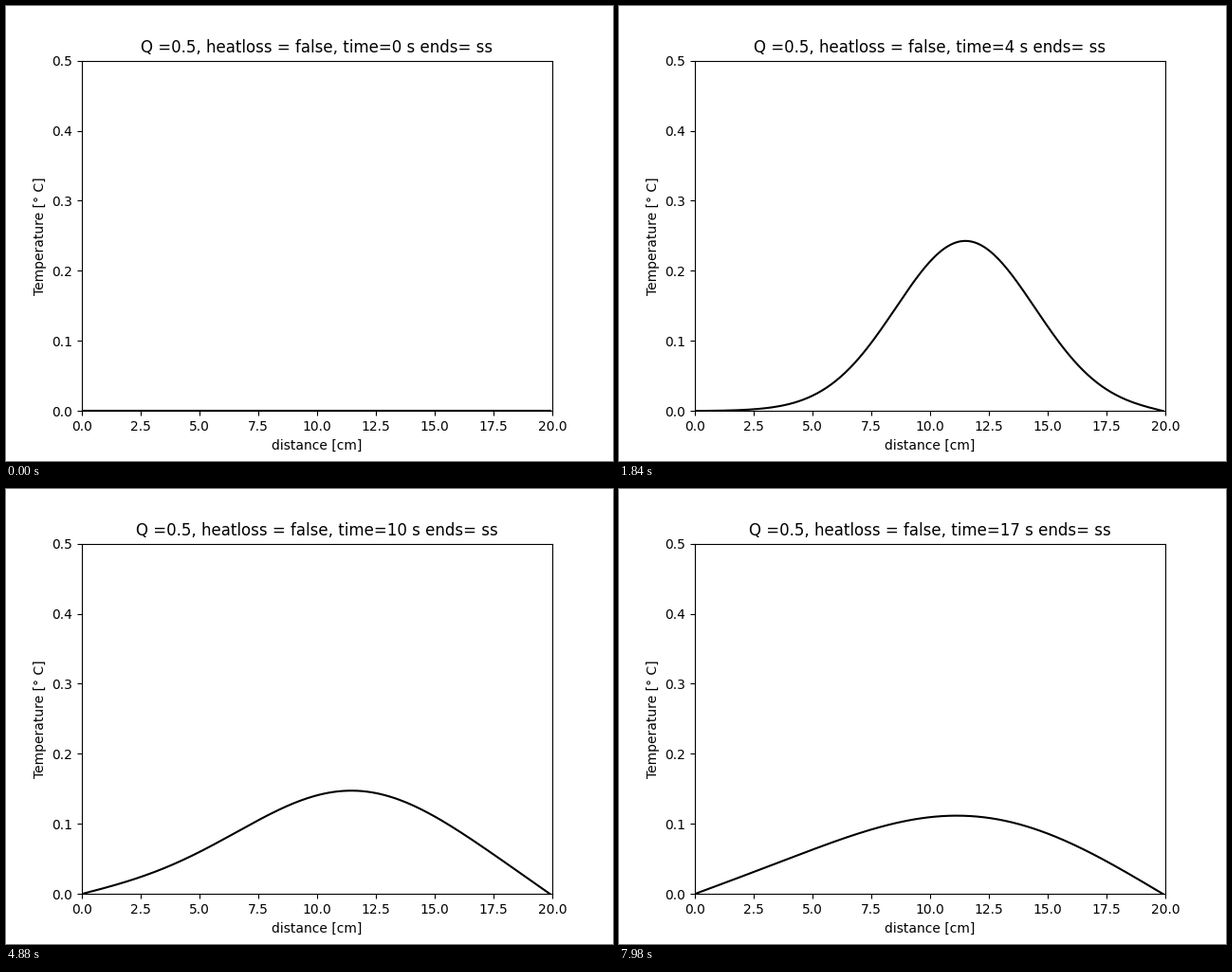
A matplotlib script for the animation above (8000 ms loop, 640x480 px).

```python
import numpy as np
import matplotlib.pyplot as plt
from matplotlib.animation import FuncAnimation

TICK = 20             # ms per animation frame
LOOP = 8000           # ms per loop
DT = 0.1              # simulated seconds per step

DIFFUSIVITY = 1.16    # cm^2/s
ROD = 19.9            # cm, both ends held at zero
HEATER_POS, HEATER_WIDTH = 11.5, 0.9
HEAT_TIME = 0.5       # s the heater stays on
HEAT_TOTAL = 1.8      # degree * cm delivered altogether

x = np.linspace(0, ROD, 200)

# Sine modes of a rod with cold ends, driven by a short block heater.
k = np.arange(1, 401) * np.pi / ROD
decay = DIFFUSIVITY * k ** 2
drive = (2 / ROD * HEAT_TOTAL / HEAT_TIME * np.sin(k * HEATER_POS)
         * np.sinc(k * HEATER_WIDTH / (2 * np.pi)))
modes = np.sin(np.outer(x, k))


def temperature(t):
    heated = min(t, HEAT_TIME)
    grown = -np.expm1(-decay * heated) / decay
    return modes @ (drive * grown * np.exp(-decay * (t - heated)))


def step_at(ms):
    """Steps come in threes, lasting 20, 100 and 20 ms."""
    cycle, rest = divmod(ms, 140)
    return 3 * cycle + (rest >= 20) + (rest >= 120)


fig, ax = plt.subplots(figsize=(6.4, 4.8), dpi=100)
line, = ax.plot(x, np.zeros_like(x), color="black", lw=1.5)
ax.set_xlim(0, 20)
ax.set_ylim(0, 0.5)
ax.set_xlabel("distance [cm]")
ax.set_ylabel("Temperature [° C]")
title = ax.set_title("")


def update(frame):
    t = step_at(frame * TICK) * DT
    line.set_ydata(temperature(t))
    title.set_text(f"Q =0.5, heatloss = false, time={t:.0f} s ends= ss")
    return line, title


anim = FuncAnimation(fig, update, frames=LOOP // TICK, interval=TICK,
                     init_func=lambda: update(0), repeat=True,
                     repeat_delay=0, blit=False)
plt.show()
```
